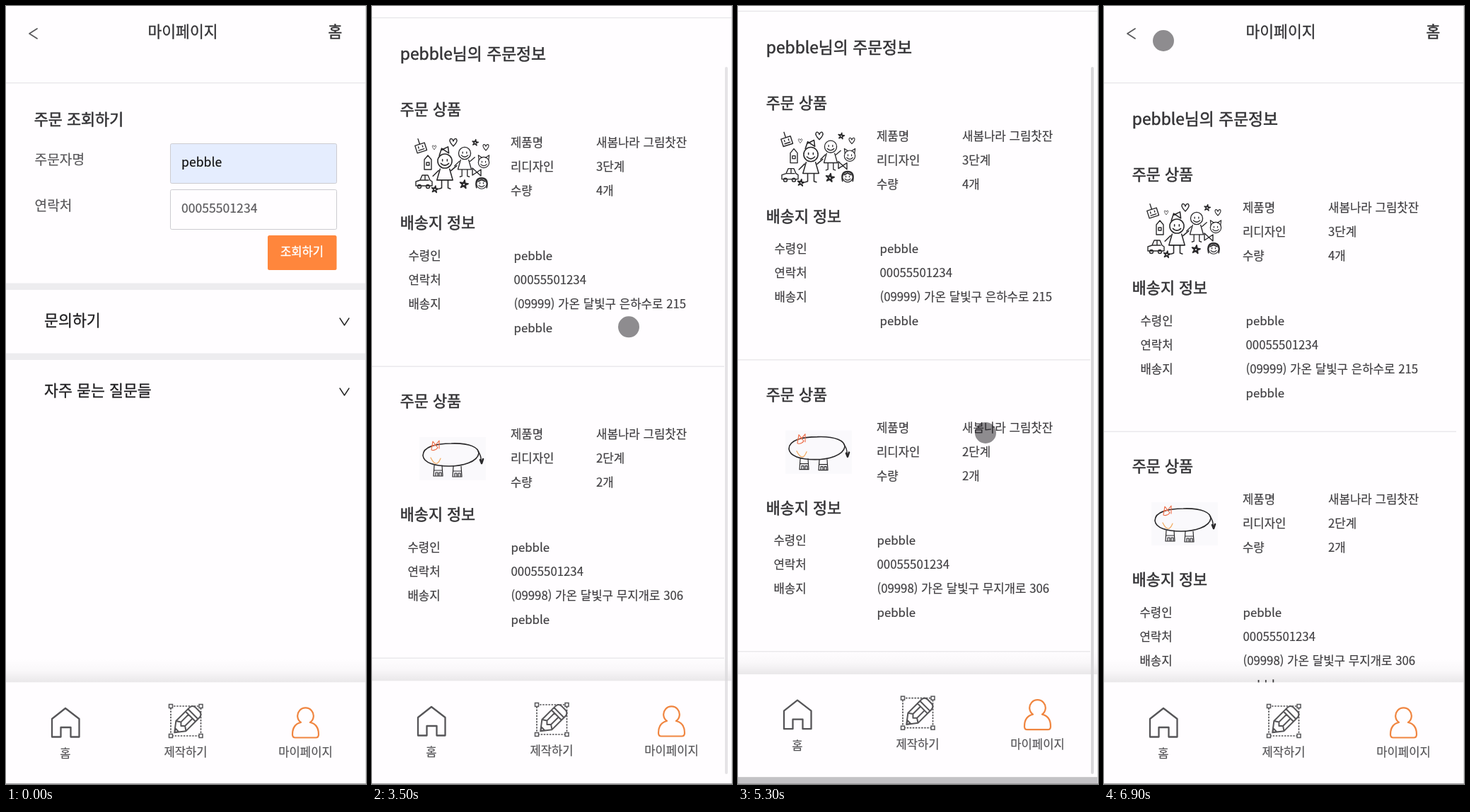
Recreate the animation shown at these times as an HTML page. Size 509x1099 px, loop 7000 ms.

```html
<!DOCTYPE html>
<html lang="ko">
<head>
<meta charset="utf-8">
<title>마이페이지</title>
<style>
html, body { margin: 0; width: 100%; height: 100%; overflow: hidden; background: #fffdff; }
svg { display: block; width: 509px; height: 1099px; }
text { font-family: "Noto Sans CJK KR", "Noto Sans CJK", sans-serif; white-space: pre; }
.line { fill: none; stroke-linecap: round; stroke-linejoin: round; }
</style>
</head>
<body>
<svg id="stage" viewBox="0 0 509 1099"></svg>
<script>
const LOOP = 7000, STEP = 100, BOTTOM = -90;
const USER = 'pebble', PHONE = '00055501234', PRODUCT = '새봄나라 그림찻잔';
const PAPER = '#fffdff', INK = '#403f42', DARK = '#353437', ICON = '#565558', RULE = '#e7e6e9', BAND = '#edecef';

// Text centred vertically on cy; bold is a thin outline that adds weight.
const text = (x, cy, size, str, { fill = INK, bold = .2, anchor = 'start' } = {}) =>
  `<text x="${x}" y="${cy + size * .36}" font-size="${size}" fill="${fill}" stroke="${fill}"
    stroke-width="${bold}" text-anchor="${anchor}">${str}</text>`;
const heading = (cy, str, size = 21.8) => text(39.8, cy, size, str, { fill: DARK, bold: .6 });
const rect = (x, y, w, h, fill, extra = '') =>
  `<rect x="${x}" y="${y}" width="${w}" height="${h}" fill="${fill}" ${extra}/>`;
const path = (d, stroke = '#29282a', width = 1.4, extra = '') =>
  `<path class="line" d="${d}" stroke="${stroke}" stroke-width="${width}" ${extra}/>`;
const place = (x, y, body, scale = 1, angle = 0) =>
  `<g transform="translate(${x} ${y}) rotate(${angle}) scale(${scale})">${body}</g>`;
const circle = (x, y, r) => `M${x - r} ${y}a${r} ${r} 0 1 0 ${2 * r} 0a${r} ${r} 0 1 0 ${-2 * r} 0`;

const header =
  path('M44 32L33 39L44 46', '#59585b', 1.7) +
  text(250, 36, 21.5, '마이페이지', { fill: DARK, anchor: 'middle', bold: .35 }) +
  text(465.5, 36, 21.5, '홈', { fill: DARK, anchor: 'middle', bold: .5 }) +
  rect(0, 108, 509, 1.3, RULE);

const fold = (y, label) =>
  rect(0, y - 52.5, 509, 9.5, BAND) +
  text(54, y, 21.7, label, { fill: '#1f1e20', bold: .3 }) +
  path(`M472 ${y - 3}l6.5 10l6.5 -10`, '#222');

const field = (y, label, value, fill, ink) =>
  text(40.5, y - 5, 19.2, label, { fill: '#575659' }) +
  rect(232.5, y - 28, 235, 56, fill, 'rx="2" stroke="#cccbd0"') +
  text(248, y - 2, 17.6, value, { fill: ink });

const form =
  heading(160, '주문 조회하기') +
  field(222.5, '주문자명', USER, '#e5edfe', '#111') +
  field(287.5, '연락처', PHONE, PAPER, '#5b5a5d') +
  rect(370, 324, 97.5, 49, '#ff863c', 'rx="2.5"') +
  text(418.5, 347.5, 16.6, '조회하기', { fill: '#fff', anchor: 'middle', bold: .4 }) +
  fold(444, '문의하기') + fold(543, '자주 묻는 질문들');

// Doodle parts, each drawn around its own origin.
const star = path('M' + [0, 1, 2, 3, 4].map(i => {
  const a = i * Math.PI * .8 - 1.4;
  return `${5 * Math.cos(a)} ${5 * Math.sin(a)}`;
}).join('L') + 'Z', undefined, 1.6);
const heart = path('M0 5C-10 -5 -2 -9 0 -2C2 -9 10 -5 0 5');
const face = path(circle(0, 0, 9) + 'M-3 -2v2M3 -2v2M-5 3q5 5 10 0');
const child = face + path('M-6 10l-4 14h20l-4 -14M-8 12l-7 7M8 12l7 -6M-4 24v10l-3 1M4 24v10l3 1');
const hat = path('M-7 -7l3 -9l9 6l-1 -8l-8 4');
const ears = path('M-8 -4l-1 -8l6 4M8 -4l1 -8l-6 4');
const hair = path('M-9 7q-4 -17 9 -17q13 0 9 17M-6 -4l6 -3l6 3', undefined, 2.2);
const robot = path('M-7 -5h14v11h-14zM-3 -2v2M3 -2v2M-4 3h8M0 -5v-8');
const tower = path('M-5 -5l5 -6l5 6v14h-10zM-2 -1h4v4h-4z');
const car = path('M-11 5v-6l6 -2l3 -7h8l3 7l3 2v6zM-5 -3h12M2 -10v7' + circle(-6, 6, 2.5) + circle(6, 6, 2.5));
const bow = path('M-6 -5v10l12 -8v9z');

const family =
  place(69, 292, robot, 1, -18) + place(79, 314, tower) + place(73, 341, car) + place(148, 326, bow) +
  place(88, 292, heart, .55) + place(115, 285, heart) + place(161, 292, heart, .8) +
  place(146, 285, star, .9) + place(89, 351, star) + place(130, 344, star, 1.2) +
  place(103, 311, child + hat, 1.12) + place(131, 300, child, .95) +
  place(158, 313, face + ears, .85) + place(155, 343, face + hair, .8);

const leg = path('M0 0l-1 15h13l-1 -15M0 7h11M2 14v-4h3v4M7 14v-4h3v4', undefined, 1.2);
const animal =
  rect(67, 701, 94, 61, '#faf9fc') +
  path('M72 727C72 714 92 710 112 710C139 709 151 716 151 724C149 736 128 742 109 742C88 742 73 737 72 727Z', undefined, 1.6) +
  place(88, 741, leg) + place(115, 742, leg) +
  path('M150 721q5 7 4 14') + path('M153 733l2 5l2 -6', undefined, 2.6) +
  path('M84 719l2 -12l4 5l5 -6v11M84 714q6 -4 9 2q-4 5 -9 3', '#ee6b45', 1.1) +
  path('M83 730q8 16 14 1', '#f3a85c', 1.2);

const rows = (top, x1, x2, cells) => cells.map(([label, value], i) =>
  text(x1, top + i * 34, 16.7, label) + text(x2, top + i * 34, 16.8, value)).join('');

const order = (y, x1, x2, step, count, address, doodle) => place(0, y,
  heading(238, '주문 상품') +
  rows(285, 196, 317, [['제품명', PRODUCT], ['리디자인', step], ['수량', count]]) +
  heading(398, '배송지 정보') +
  rows(444.5, x1, x2, [['수령인', USER], ['연락처', PHONE], ['배송지', address], ['', USER]]) +
  rect(0, 600.5, 498, 1.3, RULE)) + doodle;

const orders =
  heading(160, USER + '님의 주문정보', 22.8) +
  order(0, 51.5, 200.5, '3단계', '4개', '(09999) 가온 달빛구 은하수로 215', family) +
  order(412, 50.5, 196.5, '2단계', '2개', '(09998) 가온 달빛구 무지개로 306', animal);

const tab = (x, cy, label, icon) =>
  icon + text(x, cy, 16.6, label, { fill: ICON, anchor: 'middle' });
const house = path('M65 1032.5V1007L84 992L103.5 1007V1032.5H91.5V1019H77.5V1032.5Z', ICON, 2.3);
const handle = (x, y) => rect(x - 2.5, y - 2.5, 5, 5, PAPER, `stroke="${ICON}" stroke-width="1.5"`);
const pencil =
  rect(233, 989, 42.5, 42, 'none', `stroke="${ICON}" stroke-width="1.7" stroke-dasharray="2.5 1.6"`) +
  [233, 275.5].map(x => handle(x, 989) + handle(x, 1031)).join('') +
  place(254.5, 1010, path('M-23 0L-10 -10H16Q23 -10 23 -4V4Q23 10 16 10H-10ZM-10 -10L-6 -4L-10 0L-6 4L-10 10' +
    'M9 -10V10M14 -10V10M-6 -4H9M-6 4H9M-23 0L-18 -3V3Z', ICON, 2), 1, -45);
const person = path('M417 1012A11.3 11.3 0 1 1 430 1012C439 1014 442 1021 442 1029Q442 1033.5 438 1033.5H409' +
  'Q405 1033.5 405 1029C405 1021 408 1014 417 1012Z', '#f08540', 2.2);

const nav =
  rect(0, 922, 509, 33.5, 'url(#shade)') + rect(0, 955.5, 509, 160, PAPER) +
  tab(84, 1056, '홈', house) + tab(254, 1054, '제작하기', pencil) + tab(423.5, 1054, '마이페이지', person);

document.getElementById('stage').innerHTML =
  `<defs><linearGradient id="shade" x2="0" y2="1"><stop stop-opacity="0"/>
   <stop offset=".5" stop-opacity=".022"/><stop offset="1" stop-opacity=".085"/></linearGradient></defs>` +
  rect(0, 0, 509, 1099, PAPER) +
  `<g id="page">${header}<g id="form">${form}</g><g id="orders">${orders}</g></g><g id="nav">${nav}</g>` +
  rect(499, 3, 4, 999, '#d8d7da', 'id="bar" rx="2"') +
  rect(0, 0, 509, 0, '#c3c2c5', 'id="above"') + rect(0, 1099, 509, 0, '#c3c2c5', 'id="below"') +
  rect(508, 0, 1, 1099, '#d9d8db') + rect(0, 1098, 509, 1, '#a09fa2') +
  '<circle id="dot" r="15" fill="#1e1c20" fill-opacity=".5"/>';

const clamp = (v, lo = 0, hi = 1) => Math.max(lo, Math.min(hi, v));
const mix = (a, b, p) => a + (b - a) * p;
const set = (id, attrs) => {
  for (const name in attrs) document.getElementById(id).setAttribute(name, attrs[name]);
};
const show = (id, on) => set(id, { visibility: on ? 'visible' : 'hidden' });

// Pointer stops: time, x, y. Each leg slows towards its end.
const SHOWN = 800, LOADED = 1700;
const stops = [[SHOWN, 305, 241], [1200, 418, 347], [1500, 443, 1000], [2300, 360, 1018], [3600, 363, 450],
  [4000, 350, 450], [4700, 350, 924], [5300, 350, 603], [5900, 350, 603], [6300, 360, 751], [6700, 393, 1017], [6900, 84, 49]];

function pointer(t) {
  const i = stops.findIndex(s => s[0] > t);
  if (i < 1) return stops[i ? stops.length - 1 : 0].slice(1);
  const [t0, x0, y0] = stops[i - 1], [t1, x1, y1] = stops[i];
  const p = 1 - ((t1 - t) / (t1 - t0)) ** 2;
  return [mix(x0, x1, p), mix(y0, y1, p)];
}

// A fling hits an edge at time hit, overshoots it, then springs back steadily.
const RUN = 200, SETTLE = 600;
const flings = [
  { hit: 3100, edge: BOTTOM, over: -6 }, { hit: 4300, edge: 0, over: 6 },
  { hit: 5100, edge: BOTTOM, over: -17 }, { hit: 6100, edge: 0, over: 3 }];

function scroll(t) {
  const fling = flings.findLast(f => t > f.hit - RUN);
  if (!fling) return { y: 0, bar: 0 };
  const { hit, edge, over } = fling, left = clamp((hit + SETTLE - t) / SETTLE);
  const y = t < hit ? mix(BOTTOM - edge, edge + over, (t - hit + RUN) / RUN) : edge + over * left;
  return { y, bar: clamp(left * 2) };
}

function draw(t) {
  const { y, bar } = scroll(t), [px, py] = pointer(t);
  const inside = clamp(y, BOTTOM, 0), over = y - inside;
  const gap = Math.max(0, -over - 1.5);
  show('form', t < LOADED);
  show('orders', t >= LOADED);
  show('dot', t >= SHOWN);
  set('page', { transform: `translate(0 ${y})` });
  set('nav', { transform: `translate(0 ${over})` });
  set('bar', { y: 3 + inside / BOTTOM * 83, opacity: bar });
  set('above', { height: Math.max(0, over - 2) });
  set('below', { y: 1099 - gap, height: gap });
  set('dot', { cx: px, cy: py });
}

const start = performance.now();
function tick() {
  const t = (performance.now() - start) % LOOP;
  draw(Math.floor(t / STEP) * STEP);
  requestAnimationFrame(tick);
}
tick();
</script>
</body>
</html>
```
